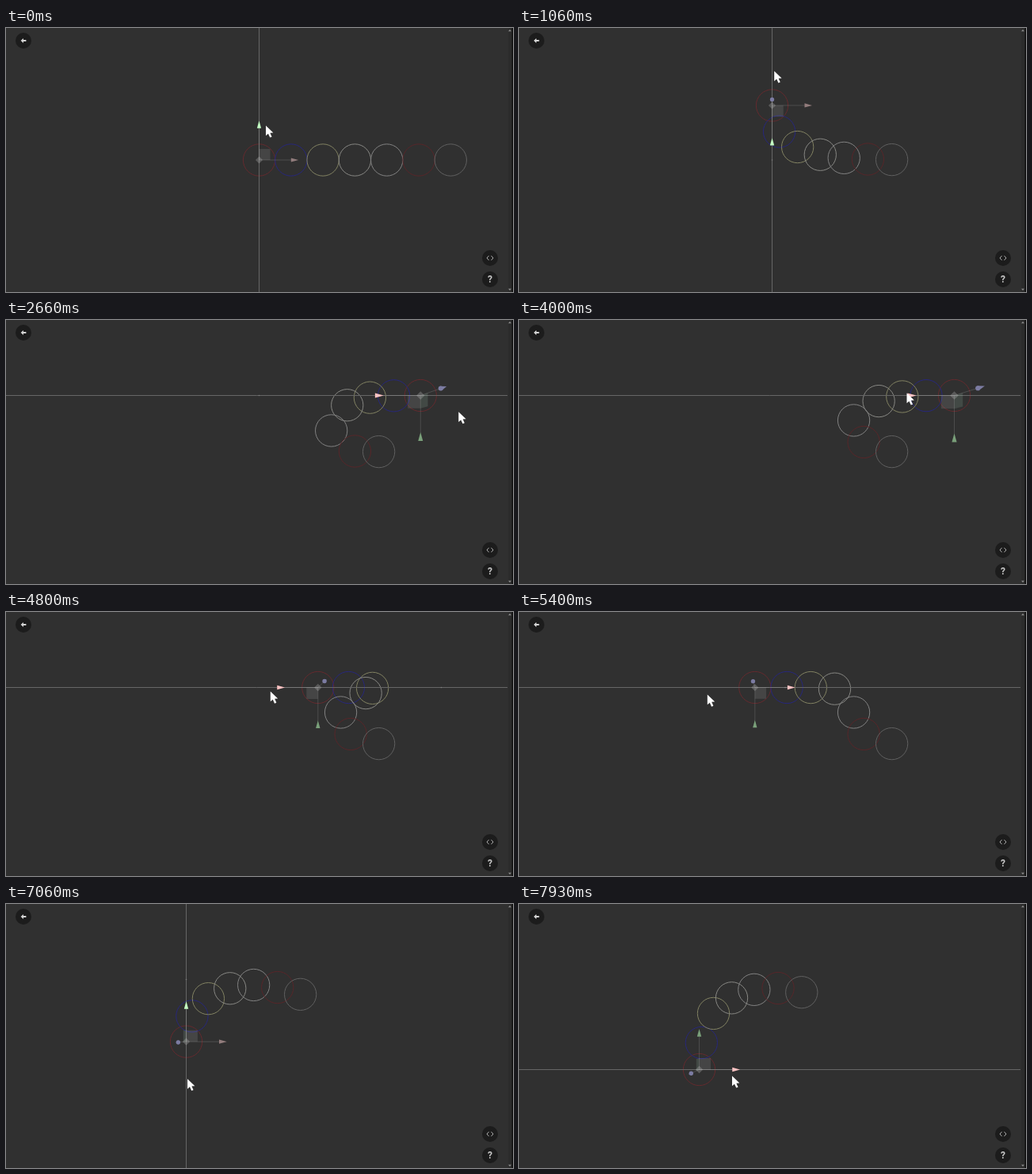
Animation of 640 by 334 pixels, one loop 8 s. Source, as an HTML page with a canvas:

```html
<!DOCTYPE html>
<html>
<head>
<meta charset="utf-8">
<style>
  html, body { margin: 0; width: 100%; height: 100%; overflow: hidden; background: #303030; }
  canvas { display: block; }
</style>
</head>
<body>
<canvas id="stage" width="640" height="334"></canvas>
<script>
const ctx = document.getElementById('stage').getContext('2d');
const LOOP = 8000, FRAMES = 120, STEP = LOOP / FRAMES, SUBSTEPS = 4;
const CX = 319.5, CY = 167, EYE = 374, UNIT = 40.3, ARM = 45, VIEW = 633;

// Mouse moves: start, end, dragged axis (if any), cursor position at the end.
const moves = [
  [120, 1185, 'Y', 321.5, 51.5],
  [1200, 1620, '', 367, 98],
  [1790, 2900, 'X', 597, 118],
  [2920, 3600, '', 489, 92],
  [4030, 5200, 'X', 275.5, 103],
  [5200, 5700, 'X', 167, 106],
  [5720, 5980, '', 174.5, 127.5],
  [5980, 6380, '', 228.5, 142],
  [6500, 7400, 'Y', 228.5, 256],
  [7480, 7860, '', 268.5, 217]
];

const ringColors = ['#642a2e', '#27277c', '#828262', '#888884', '#828282', '#572629', '#606060'];
const active = { X: '#ffc4c4', Y: '#c4ffc4', Z: '#c4c4ff' };
const faded = { X: '#927c7c', Y: '#7aa07a', Z: '#7c7ca2' };
const full = { X: '#ff0000', Y: '#00ff00', Z: '#0000ff' };
const smooth = u => u * u * (3 - 2 * u);

// Dragging moves the leader as far along the axis as the cursor goes.
function mouseAt(t) {
  let cursor = [327.5, 123], leader = [CX, CY], drag = '', origin = null;
  for (const [start, end, axis, x, y] of moves) {
    if (t < start) break;
    const u = smooth(Math.min(1, (t - start) / (end - start)));
    const dx = (x - cursor[0]) * u, dy = (y - cursor[1]) * u;
    if (t < end) [drag, origin] = [axis, leader];
    cursor = [cursor[0] + dx, cursor[1] + dy];
    if (axis === 'X') leader = [leader[0] + dx, leader[1]];
    if (axis === 'Y') leader = [leader[0], leader[1] + dy];
  }
  return { cursor, leader, drag, origin };
}

// The arrows always turn towards the middle of the stage and keep their size in space.
function gizmoFrame([x, y]) {
  const dx = x - CX, dy = y - CY, dist = Math.hypot(dx, dy, EYE), s = dist / EYE;
  return { dx, dy, dist, s, sx: dx > 1 ? -s : s, sy: dy < -1 ? s : -s };
}

function hoveredAxes([mx, my], leader) {
  const { sx, sy } = gizmoFrame(leader);
  const u = (mx - leader[0]) / sx, v = (my - leader[1]) / sy;
  const near = (along, across) => along > 0 && along < ARM * 1.2 && Math.abs(across) < 8.5;
  if (near(u, v) && near(v, u)) return 'XY';
  return near(u, v) ? 'X' : near(v, u) ? 'Y' : '';
}

// A link longer than one unit snaps back to three quarters of a unit.
function pull(chain) {
  for (let i = 1; i < chain.length; i++) {
    const [hx, hy] = chain[i - 1], [x, y] = chain[i];
    const d = Math.hypot(x - hx, y - hy);
    if (d > UNIT + 1e-6) {
      const k = 0.75 * UNIT / d;
      chain[i] = [hx + (x - hx) * k, hy + (y - hy) * k];
    }
  }
}

function simulate() {
  const chain = ringColors.map((_, i) => [CX + i * UNIT, CY]);
  const chains = [chain.slice()];
  for (let n = 1; n < FRAMES * SUBSTEPS; n++) {
    chain[0] = mouseAt(n * STEP / SUBSTEPS).leader;
    pull(chain);
    if (n % SUBSTEPS === 0) chains.push(chain.slice());
  }
  return chains;
}
const chains = simulate();

function circle(x, y, r, fill) {
  ctx.beginPath();
  ctx.arc(x, y, r, 0, 2 * Math.PI);
  ctx.fillStyle = fill;
  ctx.fill();
}

function ring(x, y, color) {
  ctx.beginPath();
  ctx.arc(x, y, UNIT / 2, 0, 2 * Math.PI);
  ctx.strokeStyle = color;
  ctx.lineWidth = 1;
  ctx.stroke();
}

function polygon(points, fill) {
  ctx.beginPath();
  points.forEach(p => ctx.lineTo(...p));
  ctx.fillStyle = fill;
  ctx.fill();
}

function line(points, color, width = 1) {
  ctx.beginPath();
  points.forEach(p => ctx.lineTo(...p));
  ctx.strokeStyle = color;
  ctx.lineWidth = width;
  ctx.stroke();
}

function drawGizmo([x, y], axes) {
  const { dx, dy, dist, s, sx, sy } = gizmoFrame([x, y]);
  const project = (px, py, pz) => {
    const k = EYE / (EYE - pz * s);
    return [CX + (dx + px * sx) * k, CY + (dy + py * sy) * k];
  };
  const tint = a => (!axes ? full : axes.includes(a) ? active : faded)[a];
  const shaft = (end, idle) => line([[x, y], end], axes ? 'rgba(190,190,190,.2)' : idle);
  const plane = (u, v, dim, idle) => {
    const corner = u.map((c, i) => c + v[i]);
    polygon([[x, y], project(...u), project(...corner), project(...v)], axes ? dim : idle);
  };
  const px = [14, 0, 0], py = [0, 14, 0], pz = [0, 0, 14];
  const showZ = Math.hypot(dx, dy) / dist > 0.1;

  shaft(project(ARM - 4, 0, 0), '#702828');
  shaft(project(0, ARM - 4, 0), '#10b010');
  if (showZ) shaft(project(0, 0, 36), '#30305c');

  plane(px, py, 'rgba(255,255,255,.1)', 'rgba(200,180,20,.5)');
  if (Math.abs(dx) / dist > 0.2) plane(py, pz, 'rgba(200,255,225,.12)', 'rgba(0,200,200,.5)');
  if (Math.abs(dy) / dist > 0.2) plane(px, pz, 'rgba(255,220,255,.12)', 'rgba(200,0,200,.5)');

  const o = 4.5 * s;
  polygon([[x, y - o], [x + o, y], [x, y + o], [x - o, y]], axes ? 'rgba(200,200,200,.28)' : '#9cb4b8');

  const [ax, ay] = project(ARM, 0, 0), [bx, by] = project(0, ARM, 0);
  const h = 2.6 * s, l = 4.7 * s;
  polygon([[ax - l, ay - h], [ax + l, ay], [ax - l, ay + h]], tint('X'));
  polygon([[bx - h, by + l], [bx, by - l], [bx + h, by + l]], tint('Y'));

  if (showZ) {
    const [zx, zy] = project(0, 0, 36), tip = project(0, 0, ARM);
    const a = Math.atan2(dy, dx), nx = -Math.sin(a) * h, ny = Math.cos(a) * h;
    circle(zx, zy, h, tint('Z'));
    polygon([[zx + nx, zy + ny], tip, [zx - nx, zy - ny]], tint('Z'));
  }
}

function drawInterface() {
  ctx.fillStyle = '#2c2c2c';
  ctx.fillRect(634, 0, 4, 334);
  ctx.fillStyle = '#0c0c0c';
  ctx.fillRect(638.5, 0, 1.5, 334);
  polygon([[634, 4.3], [636, 1.7], [638, 4.3]], '#888');
  polygon([[634, 329.7], [636, 332.3], [638, 329.7]], '#888');

  [[22, 16], [611, 291], [611, 318]].forEach(([x, y]) => circle(x, y, 10, '#1c1c1c'));
  polygon([[18.6, 16], [22, 13], [22, 15], [25.4, 15], [25.4, 17], [22, 17], [22, 19]], '#d4d4d4');
  for (const side of [-1, 1])
    line([[1.5, 288.2], [4, 291], [1.5, 293.8]].map(([dx, y]) => [611 + side * dx, y]), '#b0b0b0');
  ctx.fillStyle = '#c8c8c8';
  ctx.font = 'bold 12px Roboto, sans-serif';
  ctx.textAlign = 'center';
  ctx.fillText('?', 611, 322.3);
}

function drawCursor([x, y]) {
  const shape = [[0, 0], [0, 14.2], [3.3, 11.3], [5.8, 16.8], [8.4, 15.7], [6, 10.3], [10.4, 10]];
  polygon(shape.map(([px, py]) => [x + 0.5 + px * 0.9, y + 0.5 + py * 0.9]), '#fff');
}

function draw(frame) {
  const chain = chains[frame], [x, y] = chain[0];
  const { cursor, drag, origin } = mouseAt(frame * STEP);
  const axes = drag || hoveredAxes(cursor, chain[0]);

  ctx.fillStyle = '#303030';
  ctx.fillRect(0, 0, 640, 334);
  chain.forEach(([cx, cy], i) => ring(cx, cy, ringColors[i]));
  if (axes.includes('X')) line([[0, y], [VIEW, y]], '#666');
  if (axes.includes('Y')) line([[x, 0], [x, 334]], '#666');
  if (drag) circle(...origin, 0.8, '#808080');
  drawGizmo(chain[0], axes);
  drawInterface();
  drawCursor(cursor);
}

function tick() {
  const t = performance.now() % LOOP;
  // Frame times are rounded down to 10 ms, hence the small lead.
  draw(Math.min(FRAMES - 1, Math.floor((t + 7) / STEP)));
  requestAnimationFrame(tick);
}
tick();
</script>
</body>
</html>
```
